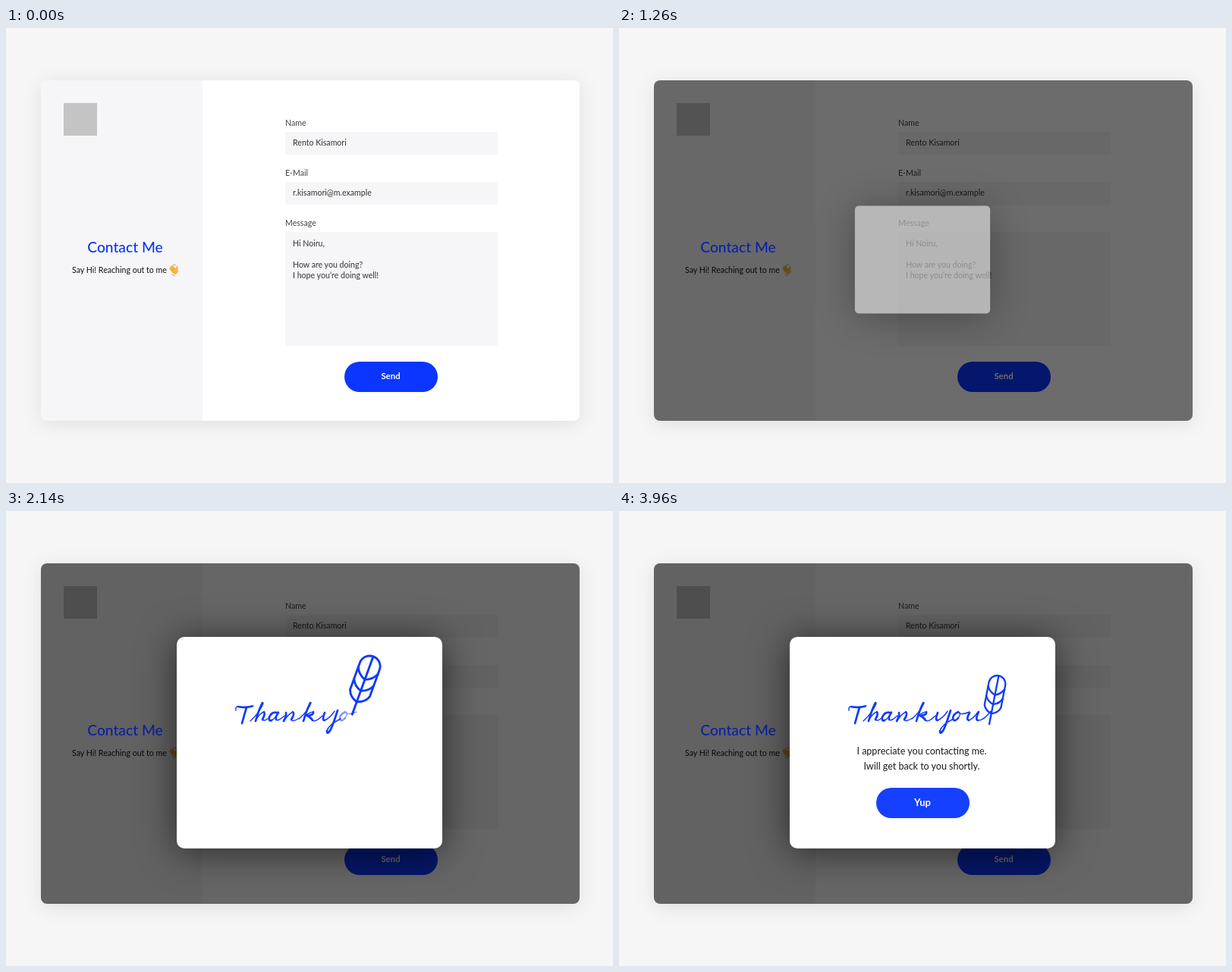
Write an HTML page that moves like this. It is 800x600 px and loops after 4.58 s.

```html
<!DOCTYPE html>
<html lang="en">
<head>
<meta charset="utf-8">
<title>Contact form</title>
<style>
  html, body { margin: 0; width: 100%; height: 100%; overflow: hidden; background: #f6f6f6; }
  svg { display: block; width: 800px; height: 600px; font: 10.6px Lato, "Open Sans", sans-serif; }
  .card { fill: #fff; filter: drop-shadow(0 4px 12px rgba(0, 0, 0, .09)); }
  .field { fill: #f6f6f8; }
  .label { fill: #444; }
  .value { fill: #333; }
  .mid { text-anchor: middle; }
  .button { font-weight: 700; fill: #fff; text-anchor: middle; }
  #sheet { fill: #fff; filter: drop-shadow(0 4px 25px rgba(0, 0, 0, .6)); }
  .ink { fill: none; stroke: #103bf8; stroke-linecap: round; stroke-linejoin: round; }
  .thick { stroke-width: 2.7; }
  .thin { stroke-width: 1.4; }
</style>
</head>
<body>
<svg viewBox="0 0 800 600">
  <defs><clipPath id="cardShape"><rect x="46" y="69" width="710" height="449" rx="8"/></clipPath></defs>
  <rect class="card" x="46" y="69" width="710" height="449" rx="8"/>
  <g clip-path="url(#cardShape)">
    <rect class="field" x="46" y="69" width="213" height="449"/>
    <rect x="76" y="99" width="44" height="43" fill="#c4c4c4"/>
    <text x="87" y="323" fill="#111">Say Hi! Reaching out to me</text>
    <g transform="translate(221.5 319.5) rotate(-38)" fill="none" stroke="#f3b843" stroke-width="2.3" stroke-linecap="round">
      <rect x="-3.6" y="-2" width="7.4" height="7.5" rx="3" fill="#f3b843" stroke="none"/>
      <path d="M-2.6 0V-5M-.4 0V-6.3M1.8 0V-5.4M3 2L6-1"/>
      <path d="M-1.5 0V-4M.7 0V-4" stroke="#c98a2b" stroke-width=".5"/>
      <path d="M3.5 -6.5Q5.5 -5.5 6 -3.8M-5.6 2Q-5.6 5-3.6 6.3" stroke="#9b9b9b" stroke-width=".8"/>
    </g>

    <g class="label">
      <text x="368" y="129">Name</text>
      <text x="368" y="195">E-Mail</text>
      <text x="368" y="261">Message</text>
    </g>
    <g class="field">
      <rect x="368" y="137" width="280" height="30" rx="2"/>
      <rect x="368" y="203" width="280" height="30" rx="2"/>
      <rect x="368" y="269" width="280" height="150" rx="2"/>
    </g>
    <g class="value">
      <text x="378" y="155">Rento Kisamori</text>
      <text x="378" y="221">r.kisamori@m.example</text>
      <text x="378" y="288">Hi Noiru,</text>
      <text x="378" y="316">How are you doing?</text>
      <text x="378" y="330">I hope you’re doing well!</text>
    </g>
    <rect id="send" x="446" y="440" width="123" height="40" rx="20"/>
    <text class="button" x="507" y="463" font-size="11.4">Send</text>
    <rect id="shade" x="46" y="69" width="710" height="449"/>
    <text id="heading" class="mid" x="157" y="295.5" font-size="19.2" font-weight="500">Contact Me</text>
  </g>

  <g id="modal"><rect id="sheet"/></g>

  <g id="word" class="ink">
    <g><path class="thin" d="M303 263Q302 257 307 258Q317 260 326 257"/>
       <path class="thick" d="M306 258Q316 260 324 257.500M317 259Q314 269 311 280"/></g>
    <g><path class="thin" d="M322 277Q334 266 339 254M329 276Q335 266 340 265M338 275Q340 278 346 273"/>
       <path class="thick" d="M338 253Q333 262 329 277M340 265Q342 268 338 275"/></g>
    <g><path class="thin" d="M350 276Q356 273 359 265M356 275Q358 278 367 270"/>
       <path class="thick" d="M358 266Q350 264 347 272Q346 278 350 276M359 266Q355 271 356 275"/></g>
    <g><path class="thin" d="M366 277Q372 268 378 265M376 275Q377 279 387 273"/>
       <path class="thick" d="M369 266Q370 270 366 277M378 265Q381 267 376 275"/></g>
    <g><path class="thin" d="M386 274Q398 264 402 253M394 271Q400 265 405 265M404 276Q408 279 417 270"/>
       <path class="thick" d="M401 253Q396 263 392 277M405 265Q406 269 397 270Q402 272 404 276"/></g>
    <g><path class="thin" d="M420 276Q427 273 433 264M423 290Q425 282 441 274"/>
       <path class="thick" d="M420 266Q416 276 420 276M437 263Q432 279 428 288Q423 296 423 290"/></g>
    <g><path class="thin" d="M447 273Q452 266 447 265Q450 270 462 265"/>
       <path class="thick" d="M447 265Q440 268 440 274Q442 279 447 273"/></g>
    <g><path class="thin" d="M461 276Q467 274 473 265M473 276Q480 277 490 264"/>
       <path class="thick" d="M462 266Q457 275 461 276M474 265Q469 275 473 276"/></g>
  </g>

  <g id="feather" class="ink" stroke-width="2.3">
    <path d="M0 0V-65M0 -14Q-9 -17 -11 -24V-54A11 11 0 0 1 11 -54V-24Q9 -17 0 -14"/>
    <path d="M-11 -49Q-8 -42 0 -39Q8 -42 11 -49M-11 -36Q-8 -29 0 -26.500Q8 -29 11 -36"/>
  </g>

  <g id="reply">
    <g class="mid" font-size="12.5" fill="#1a1a1a">
      <text x="399" y="321">I appreciate you contacting me.</text>
      <text x="399" y="341">Iwill get back to you shortly.</text>
    </g>
    <rect x="339" y="365" width="123" height="40" rx="20" fill="#1640ff"/>
    <text class="button" x="400" y="389" font-size="13">Yup</text>
  </g>
</svg>
<script>
const LOOP = 4580;
const OPEN = 1112;       // overlay and modal start together
const SETTLE = 2350;     // the quill stops writing
const $ = id => document.getElementById(id);
const letters = [...$("word").children];

const clamp = v => Math.min(1, Math.max(0, v));
const span = (t, start, length) => clamp((t - start) / length);
const mix = (a, b, p) => a + (b - a) * p;
const mixRgb = (a, b, p) => `rgb(${a.map((v, i) => Math.round(mix(v, b[i], p)))})`;
const easeOut = p => 1 - (1 - p) ** 3;

// The CSS "ease" curve, cubic-bezier(.25, .1, .25, 1)
function ease(x) {
  if (x <= 0 || x >= 1) return clamp(x);
  const bezier = (s, a, b) => 3 * s * (1 - s) ** 2 * a + 3 * s * s * (1 - s) * b + s ** 3;
  let low = 0, high = 1;
  for (let i = 0; i < 24; i++) {
    const s = (low + high) / 2;
    if (bezier(s, .25, .25) < x) low = s; else high = s;
  }
  return bezier(low, .1, 1);
}

function set(id, attributes) {
  for (const name in attributes) $(id).setAttribute(name, attributes[name]);
}

function drawQuill(t) {
  const writing = Math.min(t, SETTLE);
  const rest = easeOut(span(t, SETTLE, 150));
  const x = mix(456 + (writing - 2140) * .246, 488, rest);
  const y = mix(270 + 6 * Math.sin((writing - 2140) / 180 * 2 * Math.PI - .34), 281, rest);
  const since = Math.max(0, t - SETTLE);
  const angle = 11 + 9 * Math.exp(-since / 240) * Math.cos(since / 520 * 2 * Math.PI);
  set("feather", {
    transform: `translate(${x} ${y}) rotate(${angle}) scale(${mix(1.25, 1, rest)})`,
    opacity: span(t, 1500, 80)
  });
}

function draw(t) {
  const pressed = t < 780 ? 0 : 1 - span(t, 840, 120);
  set("send", { fill: mixRgb([12, 54, 255], [12, 56, 232], pressed) });

  const dim = ease(span(t, OPEN, 200));
  set("shade", { opacity: .6 * dim });
  set("heading", { fill: mixRgb([12, 54, 240], [10, 34, 160], dim) });

  const grow = ease(span(t, OPEN, 500));
  const width = 350 * grow, height = 279 * grow;
  set("modal", { opacity: grow });
  set("sheet", { x: 400 - width / 2, y: 305.5 - height / 2, width, height, rx: Math.min(10, height / 2) * grow });

  letters.forEach((letter, i) => letter.setAttribute("opacity", span(t, 1555 + 90 * i, 90)));
  drawQuill(t);
  set("reply", { opacity: easeOut(span(t, 2940, 700)) });
}

const begin = performance.now();
function tick() {
  draw((performance.now() - begin) % LOOP);
  requestAnimationFrame(tick);
}
tick();
</script>
</body>
</html>
```
